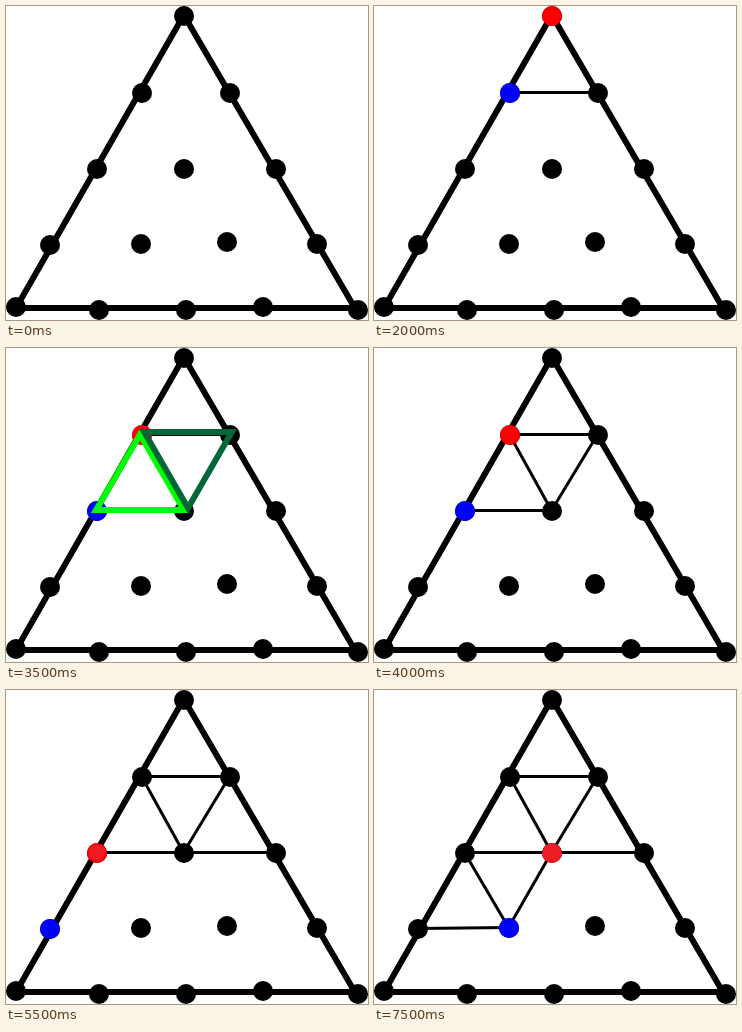
An HTML page with a canvas for the animation above (8 s loop, 362x314 px).

```html
<!DOCTYPE html>
<html>
<head>
<meta charset="utf-8">
<style>
html, body { margin: 0; width: 100%; height: 100%; overflow: hidden; background: #fff; }
canvas { display: block; }
</style>
</head>
<body>
<canvas id="stage" width="362" height="314"></canvas>
<script>
const ctx = document.getElementById('stage').getContext('2d');
const STEP = 500, STEPS = 16;
const BLACK = '#000', RED = '#f00', BLUE = '#00f', CRIMSON = '#ed1c24';
const LIGHT = '#0f0', DARK = '#006837';

// Grid points by row, top to bottom
const P = {
  a1: [178, 10],
  b1: [136, 87], b2: [224, 87],
  c1: [91, 163], c2: [178, 163], c3: [270, 163],
  d1: [44, 239], d2: [135, 238], d3: [221, 236], d4: [311, 238],
  e1: [10, 301], e2: [93, 304], e3: [180, 304], e4: [257, 301], e5: [352, 304]
};

// Thin edges: [step of appearance, from, to]
const edges = [
  [4, 'b1', 'b2'],
  [8, 'c1', 'c2'], [8, 'b1', 'c2'], [8, 'b2', 'c2'],
  [11, 'c2', 'c3'],
  [14, 'd1', 'd2'], [14, 'c1', 'd2'], [14, 'c2', 'd2']
];

// Coloured dots: [first step, end step, point, colour]
const marks = [
  [1, 5, 'a1', RED], [2, 5, 'b1', BLUE],
  [5, 9, 'b1', RED], [5, 9, 'c1', BLUE],
  [9, 11, 'b2', RED], [9, 11, 'c2', BLUE],
  [11, 15, 'c1', RED], [11, 15, 'd1', BLUE],
  [15, 16, 'c2', CRIMSON], [15, 16, 'd2', BLUE]
];

// Triangles: [first step, end step, left, top, points down]
const triangles = [
  [3, 4, 129, 3], [6, 8, 85, 81], [7, 8, 133, 81, true],
  [10, 11, 174, 81], [12, 14, 41, 157], [13, 14, 90, 158, true]
];

function path(points, width, color, closed) {
  ctx.beginPath();
  points.forEach(p => ctx.lineTo(...p));
  if (closed) ctx.closePath();
  ctx.lineWidth = width;
  ctx.strokeStyle = color;
  ctx.stroke();
}

function dot([x, y], color, r = 10) {
  ctx.beginPath();
  ctx.arc(x, y, r, 0, 7);
  ctx.fillStyle = color;
  ctx.fill();
}

function triangle(x, y, down) {
  const tip = down ? 79 : 5.5, base = down ? 3 : 81;
  path([[x + 49, y + tip], [x + 5.2, y + base], [x + 92.8, y + base]],
    6, down ? DARK : LIGHT, true);
}

function draw(step) {
  const active = ([from, to]) => step >= from && step < to;
  ctx.fillStyle = '#fff';
  ctx.fillRect(0, 0, 362, 314);
  path([[177.8, 9], [10, 302], [348.8, 302]], 6, BLACK, true);
  for (const [from, p, q] of edges)
    if (step >= from) path([P[p], P[q]].map(([x, y]) => [x - .5, y - .5]), 3, BLACK);
  for (const p of Object.values(P)) dot(p, BLACK);
  for (const m of marks.filter(active)) {
    dot(P[m[2]], m[3]);
    if (m[2] === 'c1' && m[3] === RED) dot(P.c1, CRIMSON, 8);
  }
  for (const t of triangles.filter(active)) triangle(...t.slice(2));
}

function tick() {
  draw(Math.floor(performance.now() / STEP) % STEPS);
  requestAnimationFrame(tick);
}
tick();
</script>
</body>
</html>
```
